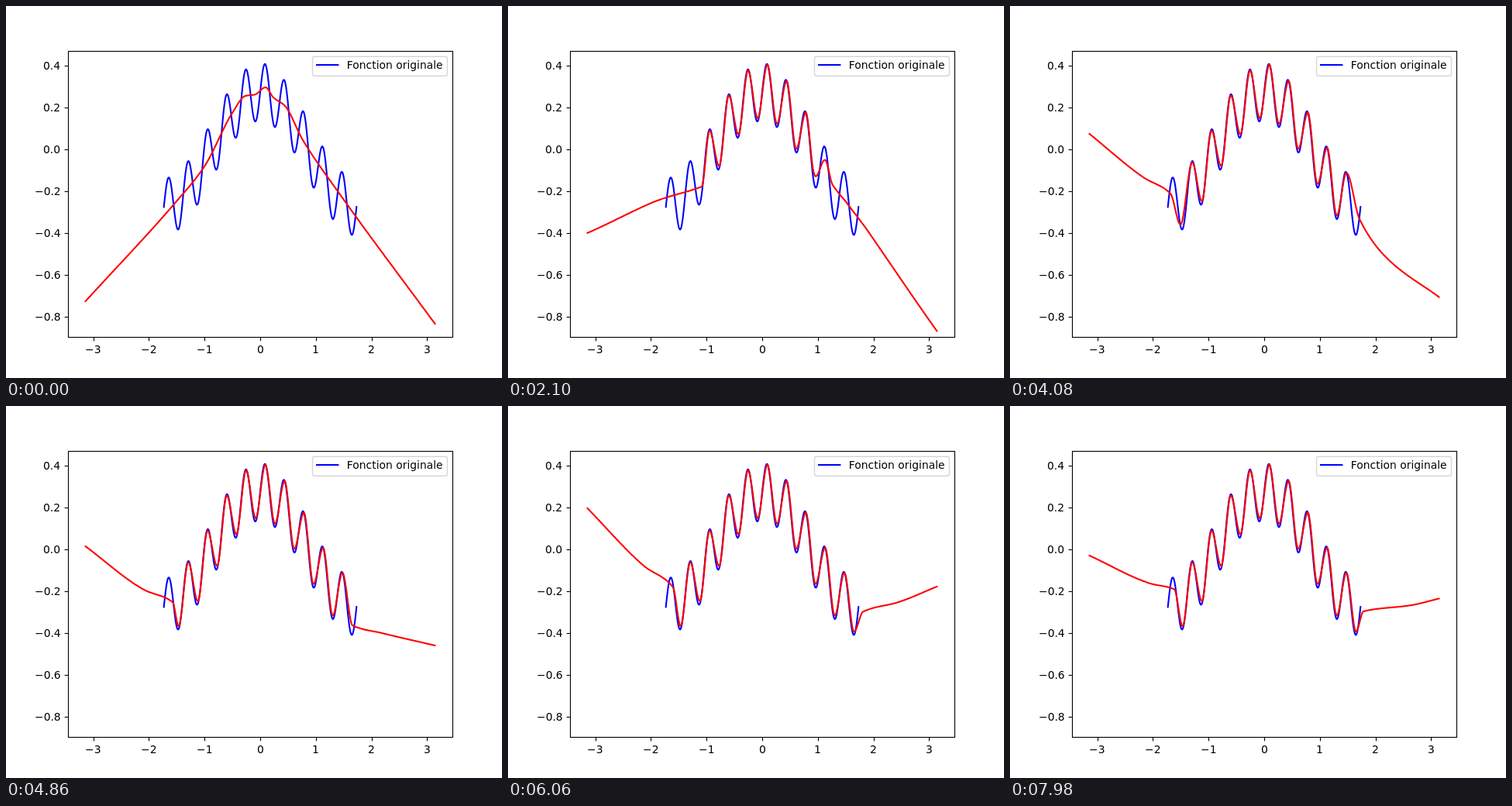
Recreate the animation shown at these times as an HTML page. Size 640 by 480 pixels, loop 8 s.

```html
<!DOCTYPE html>
<html lang="fr">
<head>
<meta charset="utf-8">
<title>Fonction originale</title>
<style>
  html, body { margin: 0; width: 100%; height: 100%; overflow: hidden; background: #fff; }
  svg { display: block; width: 100vw; height: 100vh; }
  text { font: 13.889px "DejaVu Sans", sans-serif; fill: #000; }
  .axis { fill: none; stroke: #000; stroke-width: 1.11; }
  .curve { fill: none; stroke-width: 2.083; stroke-linecap: square; stroke-linejoin: round; }
</style>
</head>
<body>
<svg viewBox="0 0 640 480">
  <path id="wave" class="curve" stroke="#00f"/>
  <path id="fit" class="curve" stroke="#f00"/>
  <g id="axes"><rect class="axis" x="80.5" y="58.5" width="496" height="369"/></g>
  <rect x="395.5" y="65.3" width="174" height="25" rx="2.8" fill="#fff" fill-opacity=".8" stroke="#ccc" stroke-opacity=".8" stroke-width="1.39"/>
  <path class="curve" stroke="#00f" d="M401 76H428.4"/>
  <text x="439.8" y="81">Fonction originale</text>
</svg>
<script>
const LOOP = 8000, STEP = 60;
const SVG = 'http://www.w3.org/2000/svg';
const px = x => 328 + 71.765 * x;
const py = y => 185.1 - 269.6 * y;
const X0 = px(-Math.PI), X1 = px(Math.PI);
const $ = id => document.getElementById(id);
const clamp = v => Math.max(0, Math.min(1, v));
const mix = (a, b, p) => a + (b - a) * p;
const range = (a, b) => Array.from({ length: b - a + 1 }, (_, i) => a + i);
const path = pts => 'M' + pts.map(([x, y]) => x.toFixed(2) + ' ' + y.toFixed(2)).join('L');

// Slow cosine plus ten ripples, u in [-pi, pi]
const wave = (u, ripple = 1) => 0.275 * Math.cos(u) + ripple * 0.1375 * Math.sin(10 * u);
const uToPx = u => px(u * Math.sqrt(3) / Math.PI);

// Learned extremum k: slightly flattened, high and late
function learned(k) {
  const u = (k + 0.5) * Math.PI / 10;
  return [uToPx(u) + 0.4, py(wave(u, 0.93)) - 1.5];
}

// Monotone cubic through points
function spline(pts) {
  const n = pts.length;
  const d = pts.slice(1).map(([x, y], i) => (y - pts[i][1]) / (x - pts[i][0]));
  const m = pts.map((_, i) => {
    if (i === 0) return d[0];
    if (i === n - 1) return d[n - 2];
    const a = d[i - 1], b = d[i];
    return a * b <= 0 ? 0 : 2 * a * b / (a + b);
  });
  return x => {
    let i = 0;
    while (i < n - 2 && x > pts[i + 1][0]) i++;
    const [xa, ya] = pts[i], [xb, yb] = pts[i + 1];
    const h = xb - xa, s = (x - xa) / h, r = 1 - s;
    return ya * (1 + 2 * s) * r * r + yb * (3 - 2 * s) * s * s
      + h * s * r * (m[i] * r - m[i + 1] * s);
  };
}

const xs = range(0, 600).map(i => mix(X0, X1, i / 600));

// Stage of the fit: left tail, learned extrema lo to hi, right tail
function stage(time, left, lo, hi, right) {
  const f = spline([...left, ...range(lo, hi).map(learned), ...right]);
  return { time, ys: xs.map(f) };
}

const stages = [
  stage(0, [[X0, 381], [220, 252], [256, 207], [292, 138], [309, 116], [321, 114.3]], 0, -1,
    [[335, 105], [345, 118], [360, 129], [383, 173], [433, 246], [X1, 410]]),
  stage(1260, [[X0, 297], [185, 256], [249.5, 228.5]], -6, 4, [[394, 207], [407, 214], [X1, 383]]),
  stage(2880, [[X0, 291], [240, 238], [250.5, 237.6]], -6, 6, [[419, 238], [465, 294], [X1, 393.5]]),
  stage(4080, [[X0, 165], [172, 221], [207, 242], [220, 282]], -8, 8, [[451, 275], [487, 326], [X1, 375.5]]),
  stage(4860, [[X0, 181], [178, 237], [215, 253]], -9, 8, [[447, 283], [485, 293], [X1, 309]]),
  stage(6060, [[X0, 132], [175, 206], [213, 234]], -9, 9, [[458, 265.5], [504, 253], [X1, 233]]),
  stage(7980, [[X0, 193], [181, 229], [212, 236.5]], -9, 9, [[456, 265], [518, 257], [X1, 248.5]])
];

const noise = n => {
  const v = Math.sin(n * 12.9898) * 43758.5453;
  return 2 * (v - Math.floor(v)) - 1;
};

function render(ms) {
  const n = Math.floor(ms / STEP), t = n * STEP;
  const i = stages.findLastIndex((s, k) => t >= s.time && k < stages.length - 1);
  const a = stages[i], b = stages[i + 1];
  const p = (t - a.time) / (b.time - a.time);
  // Between stages the tails tremble and the right one sags, less so later on
  const swing = 4 * p * (1 - p);
  const shake = 3 * Math.min(1, 2 * swing);
  const drop = 28 * swing * clamp((5400 - t) / 1000) + shake * noise(n + 1);
  const lift = shake * noise(n + 301);
  $('fit').setAttribute('d', path(xs.map((x, j) => {
    // The first ripples grow outwards from the centre
    const w = i ? p : clamp(1.6 * p - 0.6 * Math.min(1, Math.abs(x - 328) / 80));
    const y = mix(a.ys[j], b.ys[j], w);
    return [x, y + drop * clamp((x - 435) / 118) + lift * clamp((220 - x) / 117)];
  })));
}

// Tick with its label on whole pixels; align 0.5 centres, 1 ends at x
function tickMark(d, text, x, y, align) {
  const line = document.createElementNS(SVG, 'path');
  line.setAttribute('class', 'axis');
  line.setAttribute('d', d);
  const label = document.createElementNS(SVG, 'text');
  label.textContent = text.replace('-', '\u2212');
  $('axes').append(line, label);
  label.setAttribute('x', Math.round(x - align * label.getComputedTextLength()));
  label.setAttribute('y', Math.round(y));
}

function drawAxes() {
  const snap = v => Math.floor(v + 0.5) + 0.5;
  for (const v of range(-3, 3)) {
    tickMark(`M${snap(px(v))} 427.5v4.9`, String(v), px(v), 447.5, 0.5);
  }
  for (const k of range(-4, 2)) {
    const y = py(k / 5);
    tickMark(`M80.5 ${snap(y)}h-4.9`, (k / 5).toFixed(1), 70.3, y + 5.2, 1);
  }
}

drawAxes();
$('wave').setAttribute('d', path(range(-250, 250).map(i => {
  const u = Math.PI * i / 250;
  return [uToPx(u), py(wave(u))];
})));

let start;
function tick(now) {
  start ??= now;
  render((now - start) % LOOP);
  requestAnimationFrame(tick);
}
render(0);
requestAnimationFrame(tick);
</script>
</body>
</html>
```
